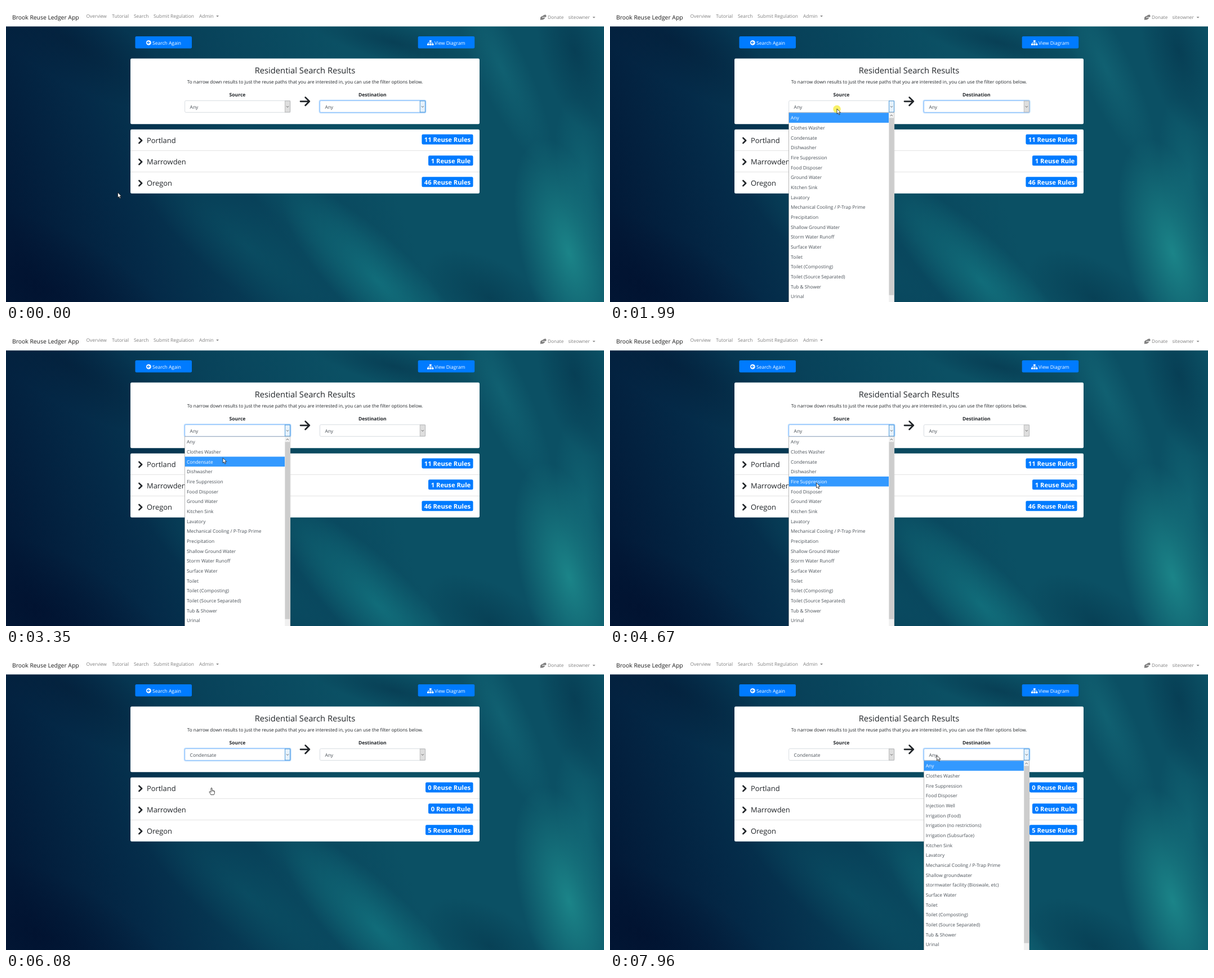
These frames come from a looping animation (1062x527 px, 8000 ms). An HTML page with a canvas:

```html
<!DOCTYPE html>
<html lang="en">
<head>
<meta charset="utf-8">
<title>Residential Search Results</title>
<style>
html, body { margin: 0; width: 100%; height: 100%; overflow: hidden; background: #06324c; }
canvas, svg { position: absolute; left: 0; top: 0; width: 1062px; height: 527px; display: block; }
text { font-family: "Open Sans", "Noto Sans", sans-serif; text-rendering: geometricPrecision; white-space: pre; }
</style>
</head>
<body>
<canvas id="sky" width="1062" height="527"></canvas>
<svg id="ui" viewBox="0 0 1062 527"><g id="base"></g><g id="live"></g></svg>
<script>
const LOOP = 8000, INK = '#212529', BLUE = '#007bff', GREY = '#808080';
const ROW_TOP = 190.2, ROW_H = 17.67;

const SOURCES = ['Any', 'Clothes Washer', 'Condensate', 'Dishwasher', 'Fire Suppression',
  'Food Disposer', 'Ground Water', 'Kitchen Sink', 'Lavatory', 'Mechanical Cooling / P-Trap Prime',
  'Precipitation', 'Shallow Ground Water', 'Storm Water Runoff', 'Surface Water', 'Toilet',
  'Toilet (Composting)', 'Toilet (Source Separated)', 'Tub & Shower', 'Urinal'];
const TARGETS = ['Any', 'Clothes Washer', 'Fire Suppression', 'Food Disposer', 'Injection Well',
  'Irrigation (Food)', 'Irrigation (no restrictions)', 'Irrigation (Subsurface)', 'Kitchen Sink',
  'Lavatory', 'Mechanical Cooling / P-Trap Prime', 'Shallow groundwater',
  'stormwater facility (Bioswale, etc)', 'Surface Water', 'Toilet', 'Toilet (Composting)',
  'Toilet (Source Separated)', 'Tub & Shower', 'Urinal'];

// start, end, x, y, and optional exponents that bend the path
const MOVES = [
  [660, 1420, 378, 197, 0.7, 1.15],
  [1520, 1650, 403, 183],
  [2640, 3390, 385, 228],
  [3490, 4380, 366.5, 272],
  [4670, 5460, 365, 238],
  [6740, 7560, 580.5, 180.5]
];

const clamp = v => Math.max(0, Math.min(1, v));
const ramp = (t, a, b) => clamp((t - a) / (b - a));
const ease = s => (1 - Math.cos(Math.PI * s)) / 2;

const esc = s => s.replace(/&/g, '&amp;');
const text = (s, x, y, size, fill = INK, extra = '') =>
  `<text x="${x}" y="${y}" font-size="${size}" fill="${fill}" ${extra}>${esc(s)}</text>`;
const rect = (x, y, w, h, fill, r = 0, extra = '') =>
  `<rect x="${x}" y="${y}" width="${w}" height="${h}" rx="${r}" fill="${fill}" ${extra}/>`;
const path = (d, fill, extra = '') => `<path d="${d}" fill="${fill}" ${extra}/>`;
const line = (d, color, w, extra = '') =>
  path(d, 'none', `stroke="${color}" stroke-width="${w}" ${extra}`);
const MIDDLE = 'text-anchor="middle"', END = 'text-anchor="end"', BOLD = 'font-weight="700"';

function paintSky() {
  const c = document.getElementById('sky').getContext('2d');
  const g = c.createLinearGradient(20, 420, 640, 190);
  g.addColorStop(0, '#021937');
  g.addColorStop(0.3, '#042a48');
  g.addColorStop(0.65, '#08425a');
  g.addColorStop(1, '#0b5064');
  c.fillStyle = g;
  c.fillRect(0, 0, 1062, 527);

  // x, y, long radius, short radius, degrees, rgb, alpha
  const glows = [
    [60, 500, 260, 110, 25, '1,15,45', 0.6],
    [110, 60, 230, 70, 30, '3,26,52', 0.5],
    [430, 430, 260, 75, 40, '12,90,108', 0.5],
    [660, 490, 230, 70, 45, '24,140,146', 0.55],
    [560, 400, 260, 60, 50, '14,96,112', 0.4],
    [880, 110, 190, 45, 65, '22,112,126', 0.5],
    [1000, 440, 210, 85, 75, '36,160,156', 0.65],
    [1030, 300, 140, 50, 80, '24,125,134', 0.4],
    [860, 520, 130, 65, 30, '4,50,72', 0.5],
    [1010, 80, 150, 60, 75, '3,46,70', 0.5],
    [690, 65, 160, 35, 15, '4,44,68', 0.45]
  ];
  for (const [x, y, rx, ry, deg, rgb, a] of glows) {
    c.save();
    c.translate(x, y);
    c.rotate(deg * Math.PI / 180);
    c.scale(rx, ry);
    const r = c.createRadialGradient(0, 0, 0, 0, 0, 1);
    r.addColorStop(0, `rgba(${rgb},${a})`);
    r.addColorStop(0.5, `rgba(${rgb},${a * 0.5})`);
    r.addColorStop(1, `rgba(${rgb},0)`);
    c.fillStyle = r;
    c.fillRect(-1, -1, 2, 2);
    c.restore();
  }
}

function button(x, label, labelX) {
  return rect(x, 54, 100.5, 21.5, BLUE, 2.3) + text(label, labelX, 68.8, 8.5, '#fff');
}

function drawBase() {
  const nav = [['Overview', 142.5], ['Tutorial', 188.3], ['Search', 227],
    ['Submit Regulation', 262], ['Admin', 343]];
  const counties = [['Portland', 239.5], ['Marrowden', 277.5], ['Oregon', 315.5]];
  const round = 'stroke-linecap="round" stroke-linejoin="round"';
  const out = [
    rect(0, 0, 1062, 36.4, '#fff'),
    text('Brook Reuse Ledger App', 11, 24, 10.36, '#1a1a1a'),
    ...nav.map(([s, x]) => text(s, x, 21.2, 8.43, GREY)),
    path('M373.2 16.9h4.8l-2.4 2.5z', GREY),
    text('Donate', 962, 23.4, 8.3, GREY),
    text('siteowner', 998.5, 23.4, 8.4, GREY),
    path('M1041.7 19.3h4.8l-2.4 2.5z', GREY),
    path('M949 20.2L952 17.8L954 18.2L952.2 20.6Q953.4 21.9 954.8 20.4L956 20.4L957.2 22L953.4 24.6L950.8 24.6L949 25z', GREY),
    path('M953.4 17.2L956 15.8L958.8 15.6L959.8 18.4L957.6 20.2L955.6 19.2L954 20.2L953.2 19.8z', GREY),

    button(229.5, 'Search Again', 260),
    '<circle cx="253.4" cy="65.3" r="4.4" fill="#fff"/>',
    line('M256 65.3h-4.8M253.4 62.9l-2.4 2.4l2.4 2.4', BLUE, 1.2),
    button(731.7, 'View Diagram', 761),
    rect(752, 61, 3.6, 3, '#fff', 0.4),
    [748, 752, 756].map(x => rect(x, 67, 3.4, 3, '#fff', 0.4)).join(''),
    line('M753.8 64v3M749.7 67v-1.6h8v1.6', '#fff', 0.8),

    rect(221, 93.5, 620, 116.7, '#fff', 2.2),
    text('Residential Search Results', 531, 120.3, 14.73, INK, MIDDLE),
    text('To narrow down results to just the reuse paths that you are interested in, you can use the filter options below.',
      531, 138.2, 8.22, INK, MIDDLE),
    text('Source', 411, 160.6, 8.55, INK, MIDDLE + ' ' + BOLD),
    text('Destination', 650.8, 160.6, 8.5, INK, MIDDLE + ' ' + BOLD),
    line('M523 169.8h14.8M531.6 162.6l7.2 7.2l-7.2 7.2', INK, 2.7, round),

    rect(221, 219.7, 620, 114, '#fff', 2.2),
    rect(221, 257.2, 620, 0.7, '#d8d8d8'),
    rect(221, 295, 620, 0.7, '#d8d8d8'),
    ...counties.map(([s, y]) =>
      line(`M236.4 ${y - 4.6}l4.7 4.6l-4.7 4.6`, INK, 2.7, round) +
      text(s, 250, y + 4.8, 12.9))
  ];
  document.getElementById('base').innerHTML = out.join('');
}

function select(x, value, glow, hot) {
  const bx = x + 177.8;
  return rect(x, 168.6, 187.3, 20.8, '#fff', 2, 'stroke="#ced4da" stroke-width=".8"') +
    `<g opacity="${glow}">` +
    rect(x - 1, 167.6, 189.3, 22.8, 'none', 2.8, 'stroke="#bfdeff" stroke-width="1.8"') +
    rect(x, 168.6, 187.3, 20.8, 'none', 2, 'stroke="#80bdff" stroke-width=".9"') + '</g>' +
    rect(bx, 169, 9.2, 20, hot ? '#e5f1fb' : '#dedede', 0,
      `stroke="${hot ? '#2b87d3' : '#b0b0b0'}" stroke-width=".8"`) +
    line(`M${bx + 2.5} 178.2l2.1 2.1l2.1-2.1`, '#444', 0.8) +
    text(value, x + 9, 182.8, 8.4, '#495057');
}

function dropdown(x, items, active) {
  const sx = x + 177.6;
  return rect(x, 189.8, 187.2, 345, '#fff', 0, 'stroke="#9a9a9a" stroke-width=".7"') +
    rect(sx, 190.2, 9.2, 340, '#f0f0f0') +
    rect(sx + 0.3, 199.3, 8.6, 315.4, '#cdcdcd') +
    line(`M${sx + 2.4} 196l2.2-2.2l2.2 2.2`, '#555', 0.9) +
    rect(x + 0.2, ROW_TOP + active * ROW_H, 177.2, ROW_H, '#3399ff') +
    items.map((s, i) => text(s, x + 3.4, (ROW_TOP + i * ROW_H + 12).toFixed(2), 8.35,
      i === active ? '#fff' : '#495057')).join('');
}

function badge(left, label, y) {
  return rect(left, y, 829.5 - left, 18, BLUE, 2.3) +
    text(label, 825.2, y + 13.6, 11.2, '#fff', END + ' ' + BOLD);
}

function pointerAt(t) {
  let x = 198.5, y = 332;
  for (const [a, b, nx, ny, kx = 1, ky = 1] of MOVES) {
    const e = ease(ramp(t, a, b));
    x += (nx - x) * e ** kx;
    y += (ny - y) * e ** ky;
    if (t < b) break;
  }
  return [x, y];
}

const ARROW = 'M0 0V9.1L2.1 7.2L3.6 10.6L5.1 10L3.7 6.7H6.5Z';
const HAND = 'M-1 1Q0 -.6 1 1V4.8Q2.1 4 2.8 5.2Q3.8 4.6 4.3 5.8Q5.4 5.5 5.4 7V9Q5.2 10.8 4.2 12.6H-1.2' +
  'Q-1.8 11 -3.8 8.2Q-4.2 6.6 -2.8 6.8L-1 8.2Z';

function pointer(x, y, hand) {
  return `<g transform="translate(${x.toFixed(2)} ${y.toFixed(2)})">` +
    path(hand ? HAND : ARROW, '#fff', 'stroke="#111" stroke-width=".75" stroke-linejoin="round"') +
    (hand ? line('M1 4.8V7M2.9 5.2V7.2M4.3 5.8V7.4', '#111', 0.5) : '') + '</g>';
}

function scene(t) {
  const [x, y] = pointerAt(t);
  const between = (a, b) => t >= a && t < b;
  const picked = t >= 6080;
  const srcOpen = between(1960, 6080), dstOpen = t >= 7760;
  const srcHot = between(1930, 7730);
  const srcGlow = ramp(t, 2090, 2180) - ramp(t, 7890, 7960);
  const pressed = between(1930, 2090) || between(5950, 6080) || between(7730, 7890);
  const row = Math.max(0, Math.floor((y - ROW_TOP) / ROW_H));
  const hand = !srcOpen && !dstOpen && x > 221 && x < 841 && y > 219.7 && y < 333.7;

  return select(317.6, picked ? 'Condensate' : 'Any', srcGlow, srcHot) +
    select(557.4, 'Any', 1 - srcGlow, !srcHot) +
    (picked
      ? badge(745, '0 Reuse Rules', 228.4) + badge(750, '0 Reuse Rule', 266.2) + badge(745, '5 Reuse Rules', 304.2)
      : badge(738.4, '11 Reuse Rules', 228.4) + badge(750, '1 Reuse Rule', 266.2) + badge(738.4, '46 Reuse Rules', 304.2)) +
    (srcOpen ? dropdown(317.6, SOURCES, row) : '') +
    (dstOpen ? dropdown(557.4, TARGETS, row) : '') +
    (pressed ? `<circle cx="${x}" cy="${y + 0.6}" r="6.8" fill="#f6e90a" opacity=".62"/>` : '') +
    pointer(x, y, hand);
}

const live = document.getElementById('live');
let shown = '';
function frame() {
  const next = scene(performance.now() % LOOP);
  if (next !== shown) live.innerHTML = shown = next;
  requestAnimationFrame(frame);
}

paintSky();
drawBase();
frame();
</script>
</body>
</html>
```
